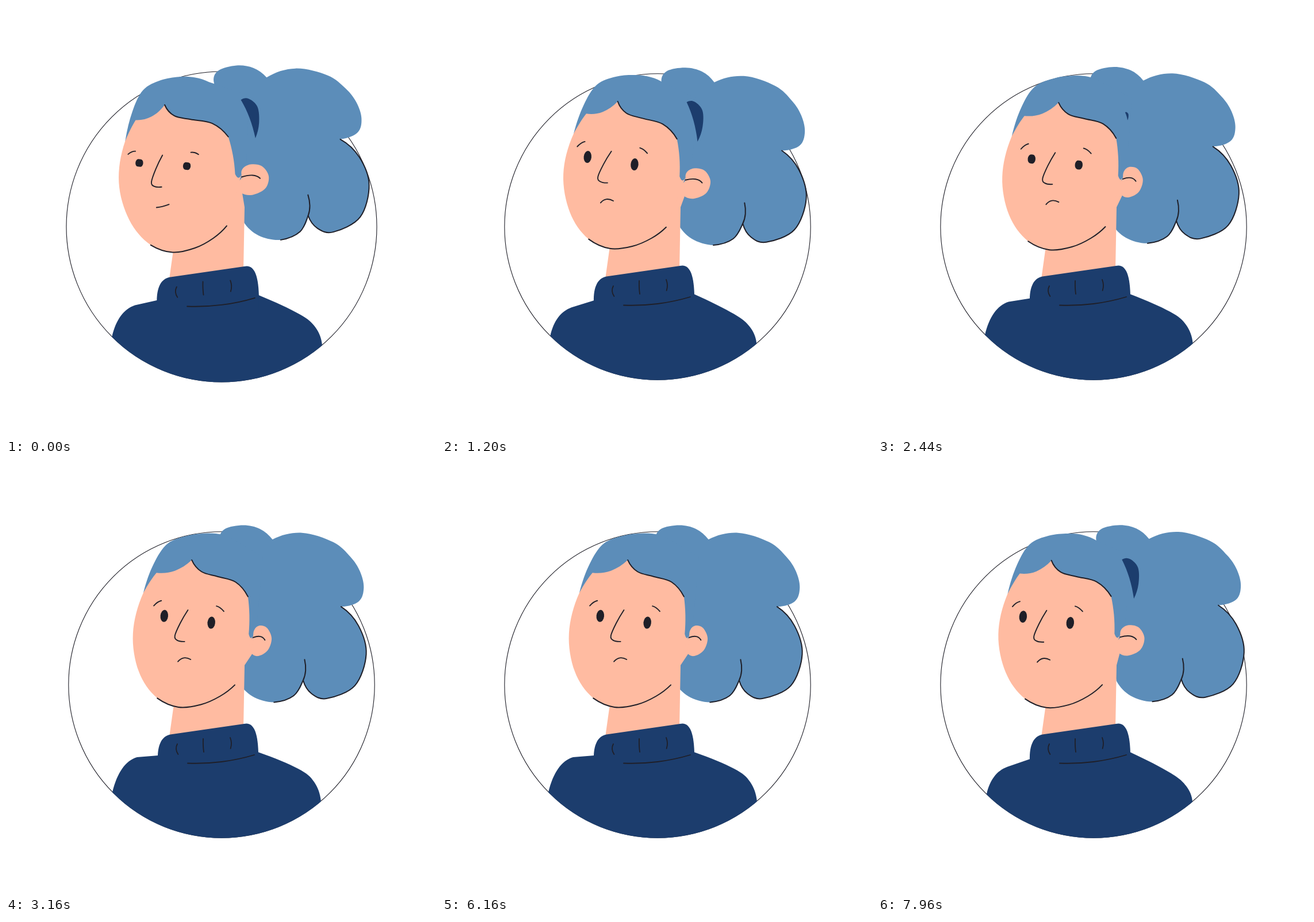
An HTML page with a canvas for the animation above (8000 ms loop, 748 px wide and 748 px high).

```html
<!DOCTYPE html>
<html lang="en">
<head>
<meta charset="utf-8">
<title>Portrait</title>
<style>
html, body { margin: 0; width: 100%; height: 100%; overflow: hidden; background: #fff; }
canvas { display: block; }
</style>
</head>
<body>
<canvas id="stage" width="748" height="748"></canvas>
<script>
const ctx = document.getElementById('stage').getContext('2d');
const LOOP = 8000;
const BLUE = '#5c8db9', SKIN = '#ffbba1', NAVY = '#1c3d6d', INK = '#1f1f28';
const CX = 375, CY = 384, R = 266.2;

const clamp = (v, a = 0, b = 1) => Math.min(b, Math.max(a, v));
const mix = (a, b, k) => a + (b - a) * k;
const smooth = v => v * v * (3 - 2 * v);
const pts = s => s.split(' ').map(p => p.split(',').map(Number));

// Key points of the resting pose; curves run smoothly through them.
const BUN = pts('379,132 388,113 420,106 449,112 471,130');
const TAIL = pts('471,130 522,117.5 577,133 607,158 624,183 631,211 623,235 592,245');
const LOBE = pts('592,245 623,278 637,327 618,382 570,405 543,397 528,374');
const UNDER = pts('528,374 512,401 478,413 440,403 415,377');
const CURL = pts('530,338 532,357 528,374 512,401 478,413');
const TIE = pts('424,166 438,165 452,180 453,208 445,234');
const TIE_EDGE = pts('445,234 437,198 424,166');

const CAP = pts('225,226 241,176 263,140 296,125 330,121 357,124 379,133');
const CAP_BACK = pts('440,160 425,330');
const SIDEBURN = pts('421,296 416,302 411,295');
const TEMPLE = pts('411,295 410,262 405,230');
const FRINGE = pts('405,230 380,205 345,196 317,188 301,168');
const BANG = pts('301,168 275,187 246,191');
const HAIRLINE = pts('246,191 236,206 225,226');
const CHEEK = pts('225,226 209,297 222,363 256,409');
const CHIN = pts('256,409 293,424 332,419 365,404 390,384');
const EAR = pts('421,297 424,286 436,280 453,284 463,302 456,323 435,333 418,328');
const EAR_FOLD = pts('421,301 438,299 449,305');
const NOSE = pts('293,255 280,278 271,300 275,308 288,310');

// Cubic timing curve (.4, 0, .2, 1), solved by bisection.
function ease(x) {
  if (x <= 0 || x >= 1) return clamp(x);
  let lo = 0, hi = 1, s = 0.5;
  for (let i = 0; i < 24; i++) {
    s = (lo + hi) / 2;
    const r = 1 - s;
    if (1.2 * r * r * s + 0.6 * r * s * s + s * s * s < x) lo = s; else hi = s;
  }
  return smooth(s);
}

function poseAt(t) {
  const u = clamp(t / 800);
  const settle = 1 - (1 - u) ** 5;
  const m = Math.min(t, 10040 - t);   // the turn back mirrors the turn out
  const p = ease((m - 1840) / 1200);
  const aim = mix(-0.163, 1, p);
  const nod = 0.015 * aim - 0.075 * p * (1 - p) + 0.033 * (1 - p) ** 7;
  const lid = (center, half) => Math.abs(t - center) / half;
  return {
    turn: mix(-0.5, aim, 1 - (1 - u) ** 2),
    tilt: mix(-0.063, nod, settle),
    worry: settle,
    scale: mix(1.0145, 1, settle),
    open: clamp(Math.min(0.62 + t / 200, lid(2560, 160), lid(4400, 80), lid(5680, 120), lid(7480, 160)), 0.17)
  };
}

// Three depths of the head: the ponytail swings back, the outline follows
// the turn a little, the face features follow it fully.
function warps({ turn, tilt }) {
  const rotate = (x, y, cx, cy) => [x - (y - cy) * tilt, y + (x - cx) * tilt];
  const follow = (x, y) => 10
    + 10 * Math.exp(-(((x - 330) / 70) ** 2)) * clamp((300 - y) / 60)
    - 13 * smooth(clamp((x - 400) / 70))
    - 3 * clamp((y - 300) / 100);
  const moved = (x, y, cx, cy, dx) => {
    const [rx, ry] = rotate(x, y, cx, cy);
    return [rx + dx, ry];
  };
  const swing = -10 * Math.sin(Math.abs(turn) * Math.PI / 2);
  return {
    tail: ([x, y]) => moved(x, y, 380, 300, swing),
    head: ([x, y]) => moved(x, y, 365, 420, turn * follow(x, y)),
    face: ([x, y]) => moved(x, y, 365, 420, turn * 21)
  };
}

// Smooth curve through points; the ends extend as parabolas.
function curve(p, join) {
  const n = p.length;
  const beyond = (a, b, c) => [0, 1].map(i => 3 * a[i] - 3 * b[i] + c[i]);
  const q = [beyond(p[0], p[1], p[2]), ...p, beyond(p[n - 1], p[n - 2], p[n - 3])];
  if (join) ctx.lineTo(...p[0]); else ctx.moveTo(...p[0]);
  for (let i = 1; i < n; i++) {
    const [a, b, c, d] = q.slice(i - 1, i + 3);
    ctx.bezierCurveTo(b[0] + (c[0] - a[0]) / 6, b[1] + (c[1] - a[1]) / 6,
      c[0] - (d[0] - b[0]) / 6, c[1] - (d[1] - b[1]) / 6, ...c);
  }
}
function fill(color, warp, curves, corners = []) {
  ctx.beginPath();
  curves.forEach((c, i) => curve(c.map(warp), i > 0));
  corners.forEach(c => ctx.lineTo(...warp(c)));
  ctx.fillStyle = color;
  ctx.fill();
}
function line(warp, points, width = 1.9) {
  ctx.beginPath();
  curve(points.map(warp));
  ctx.lineWidth = width;
  ctx.stroke();
}
const still = p => p;

function disc(r) {
  ctx.beginPath();
  ctx.arc(CX, CY, r, 0, Math.PI * 2);
}

function scaled(scale, paint) {
  ctx.save();
  ctx.translate(CX, CY);
  ctx.scale(scale, scale);
  ctx.translate(-CX, -CY);
  paint();
  ctx.restore();
}

function drawSweater(lift) {
  disc(R + 0.5);
  ctx.clip();
  fill(NAVY, still, [
    [[189 - 4 * lift, 574 - 3 * lift], [202, 544 - 14 * lift], [225 + 3 * lift, 527 - 17 * lift]],
    [[265, 513 - 6 * lift], [350, 505], [438, 501]],
    [[438, 501], [508, 537 - 7 * lift], [536, 560 - 7 * lift], [547 + lift, 587]]
  ], [[570, 700], [160, 700]]);
  fill(NAVY, still, [
    [[264, 515], [269, 484], [286, 470.5]],
    [[414, 452], [432, 461.5], [439, 502]]
  ], [[439, 530], [264, 530]]);
  const rib = (x, y, length, bend) =>
    line(still, [[x, y], [x + bend, y + length / 2], [x + 1 - bend * 0.2, y + length]], 1.8);
  rib(298, 487, 18, -2);
  rib(343, 478, 23, 0);
  rib(390, 476, 19, 2);
  line(still, [[316, 520.5], [375, 518], [432, 506]], 1.8);
}

function drawTie(turn, warp) {
  const size = clamp(1 - turn * 1.08);   // it slips behind the head
  const shrink = ([x, y]) => warp([mix(443, x, size), mix(190, y, size)]);
  if (size > 0) fill(NAVY, shrink, [TIE, TIE_EDGE]);
}

function drawEye(warp, x, y, open) {
  const w = 13.4, h = 21 * open;
  ctx.save();
  ctx.translate(...warp([x, y]));
  ctx.rotate(0.1);
  ctx.beginPath();
  ctx.roundRect(-w / 2, -h / 2, w, h, { x: mix(0.8, 6.7, open), y: h / 2 });
  ctx.fillStyle = INK;
  ctx.fill();
  ctx.restore();
}

function drawBrow(warp, x, y, side, worry) {
  const rise = side * mix(2.2, 4.5, worry);
  const cy = y + 3.5 * (1 - worry);
  line(warp, [[x - 6.5, cy + rise], [x, cy - 1.5], [x + 6.5, cy - rise]]);
}

function drawFace(face, { open, worry }) {
  line(face, NOSE);
  line(face, [[277, 345], [287, mix(344, 338.5, worry)], [299, 341]]);
  drawBrow(face, 240, 244, 1, worry);
  drawBrow(face, 349, 252, -1, worry);
  drawEye(face, 252, 266, open);
  drawEye(face, 334, 276.5, open);
}

function draw(t) {
  const pose = poseAt(t);
  const { tail, head, face } = warps(pose);
  ctx.fillStyle = '#fff';
  ctx.fillRect(0, 0, 748, 748);
  ctx.strokeStyle = INK;
  ctx.lineCap = ctx.lineJoin = 'round';

  scaled(pose.scale, () => {
    disc(R);
    ctx.lineWidth = 1.1;
    ctx.stroke();
  });

  fill(BLUE, tail, [BUN, TAIL, LOBE, UNDER]);
  fill(BLUE, head, [CAP], CAP_BACK);
  drawTie(pose.turn, tail);

  ctx.beginPath();
  [[292, 418], [284, 475], [413, 460], [415, 350], head([420, 330]), head([426, 298])]
    .forEach(p => ctx.lineTo(...p));
  ctx.fillStyle = SKIN;
  ctx.fill();
  fill(SKIN, head, [SIDEBURN, TEMPLE, FRINGE, BANG, HAIRLINE, CHEEK, CHIN]);
  fill(SKIN, head, [EAR]);
  scaled(pose.scale, () => drawSweater(Math.abs(pose.turn)));

  [LOBE, CURL].forEach(p => line(tail, p, 2));
  [FRINGE, CHIN].forEach(p => line(head, p, 2));
  line(head, EAR_FOLD);
  drawFace(face, pose);
}

const start = performance.now();
function tick() {
  draw((performance.now() - start) % LOOP);
  requestAnimationFrame(tick);
}
tick();
</script>
</body>
</html>
```
